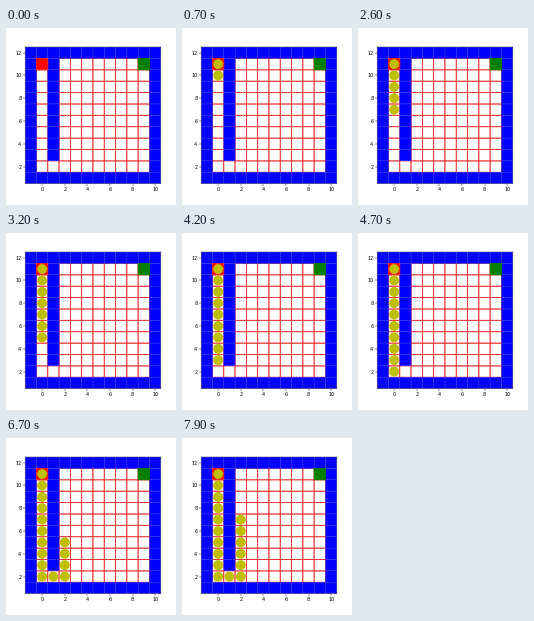
A matplotlib script for the animation above (8000 ms loop, 170x177 px).

```python
import matplotlib.pyplot as plt
import numpy as np
from matplotlib.animation import FuncAnimation
from matplotlib.patches import Circle, Rectangle

W, H = 170, 177
FRAMES, STEP = 80, 100
LEFT, RIGHT, TOP, BOTTOM = 19.2, 154.8, 19, 155.6

START, GOAL = (0, 11), (9, 11)
PATH = ([(0, y) for y in range(11, 1, -1)] + [(1, 2)]
        + [(2, y) for y in range(2, 8)])
FIRST, BEAT = 200, 500  # ms; one beat per move
CORNER = (2, 2)         # passed without a beat of its own


def is_wall(x, y):
    return x in (-1, 10) or y in (1, 12) or (x == 1 and y >= 3)


def cell(x, y, face, edge, width, zorder):
    ax.add_patch(Rectangle((x - 0.5, y - 0.5), 1, 1, facecolor=face,
                           edgecolor=edge, linewidth=width, zorder=zorder,
                           snap=False))


def path_times():
    t, times = FIRST, []
    for p in PATH:
        times.append(t)
        if p != CORNER:
            t += BEAT
    return times


fig = plt.figure(figsize=(W / 100, H / 100), dpi=100, facecolor="white")
ax = fig.add_axes([LEFT / W, 1 - BOTTOM / H,
                   (RIGHT - LEFT) / W, (BOTTOM - TOP) / H])
ax.set(xlim=(-1.5, 10.5), ylim=(0.5, 12.5),
       xticks=range(0, 11, 2), yticks=range(2, 13, 2))
ax.tick_params(labelsize=3.5, length=1.3, width=0.3, pad=1.5)
for spine in ax.spines.values():
    spine.set(linewidth=0.4, color="#555555", snap=False)

for x in range(-1, 11):
    for y in range(1, 13):
        if is_wall(x, y):
            cell(x, y, "blue", "blue", 0.3, 2)
        else:
            cell(x, y, "white", "red", 0.6, 1)
cell(*START, "red", "red", 0.6, 3)
cell(*GOAL, "green", "green", 0.6, 5)

# Dashed cell borders
grid = dict(color="#b0b0b0", linewidth=0.35, alpha=0.6,
            linestyle=(0, (4, 2)), zorder=4, snap=False)
for x in np.arange(-0.5, 10):
    ax.axvline(x, **grid)
for y in np.arange(1.5, 12):
    ax.axhline(y, **grid)

fig.add_artist(plt.Line2D([0, 1], [0.5 / H] * 2, color="#d0d0d0",
                          linewidth=0.7))

dots = [ax.add_patch(Circle(p, 0.44, color="#bfbf00", linewidth=0,
                            zorder=6, visible=False)) for p in PATH]
times = path_times()


def update(i):
    for dot, t in zip(dots, times):
        dot.set_visible(i * STEP >= t)
    return dots


anim = FuncAnimation(fig, update, frames=FRAMES, interval=STEP,
                     repeat=True, repeat_delay=0)
plt.show()
```
